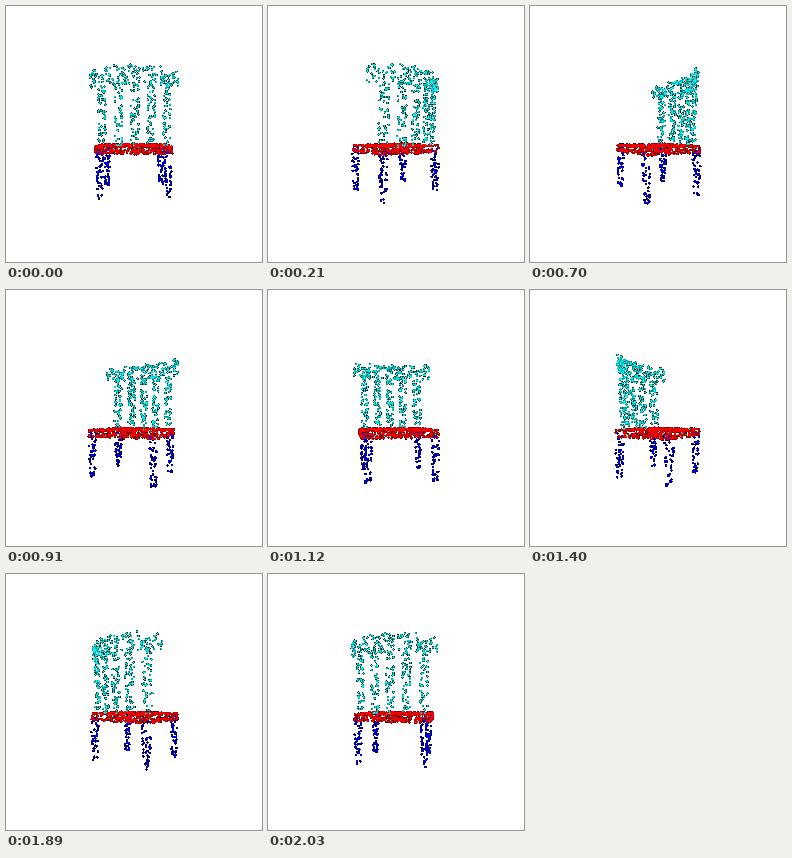
A matplotlib script that plays this animation: 256 px wide and 256 px high, repeating every 2100 ms.

```python
import numpy as np
import matplotlib.pyplot as plt
from matplotlib.animation import FuncAnimation

SIZE = 256
FRAMES = 30
DIST = 3.0                                     # camera distance
FOCAL = SIZE / 2 / np.tan(np.radians(30))      # 60 degree field of view
RADIUS = 0.01 * SIZE / 2

CYAN, BLUE, RED = (0, 1, 1), (0, 0, 1), (1, 0, 0)

rng = np.random.default_rng(5)


def box_shell(n, w, d):
    """Random points on the outline of a w x d rectangle."""
    a, b = rng.uniform(-1, 1, (2, n))
    side = rng.choice([-1, 1], n)
    wide = rng.random(n) < w / (w + d)
    return np.where(wide, a, side) * w / 2, np.where(wide, side, b) * d / 2


def back_depth(x, z):
    """Curved backrest, leaning slightly outwards."""
    return 0.385 - 0.6 * x**2 + 0.03 * z


def back_part(n, center, width, low, high):
    dx, dy = box_shell(n, width, 0.045)
    x = center + dx
    z = rng.uniform(low, high, n)
    return np.column_stack([x, back_depth(x, z) + dy, z])


def leg(n, x, y):
    z = rng.uniform(-0.775, -0.19, n)
    taper = 0.6 + 0.4 * (z + 0.775) / 0.585
    dx, dy = box_shell(n, 0.085, 0.085)
    return np.column_stack([x + dx * taper, y + dy * taper, z])


def seat(n, top=-0.155, bottom=-0.237):
    """Rounded slab: top, bottom and rim."""
    a, b = rng.uniform(-1, 1, (2, 2 * n))
    r = (a**6 + b**6) ** (1 / 6)
    keep = np.flatnonzero(r <= 1)[:n]
    a, b, r = a[keep], b[keep], r[keep]
    kind = rng.random(n)
    rim = kind < 0.2
    a, b = np.where(rim, a / r, a), np.where(rim, b / r, b)
    z = np.where(kind < 0.6, top, bottom)
    z = np.where(rim, rng.uniform(bottom, top, n), z)
    return np.column_stack([0.485 * a, 0.445 * b - 0.025, z])


back = [back_part(160, 0, 1.1, 0.58, 0.805)]
back += [back_part(50, x, 0.085, -0.14, 0.58)
         for x in (-0.39, -0.185, 0.01, 0.205, 0.4)]
legs = [leg(43, x, y) for x in (-0.41, 0.41) for y in (-0.38, 0.325)]
parts = [(np.vstack(back), CYAN), (np.vstack(legs), BLUE), (seat(440), RED)]

points = np.vstack([p for p, _ in parts])
colors = np.vstack([np.tile(c, (len(p), 1)) for p, c in parts]).astype(float)


def render(i):
    """Blend soft dots from far to near; uncovered pixels stay white."""
    t = 2 * np.pi * i / FRAMES
    x, y, z = points.T
    near = y * np.cos(t) - x * np.sin(t)
    scale = FOCAL / (DIST - near)
    sx = SIZE / 2 + (x * np.cos(t) + y * np.sin(t)) * scale
    sy = SIZE / 2 - z * scale

    img = np.zeros((SIZE, SIZE, 3))
    hit = np.zeros((SIZE, SIZE), bool)
    step = np.arange(-1, 2)
    for k in np.argsort(near):
        c, r = int(sx[k]), int(sy[k])
        dx = c + step + 0.5 - sx[k]
        dy = r + step + 0.5 - sy[k]
        alpha = np.clip(1 - (dx**2 + dy[:, None]**2) / RADIUS**2, 0, 1)
        win = np.s_[r - 1:r + 2, c - 1:c + 2]
        img[win] += alpha[..., None] * (colors[k] - img[win])
        hit[win] |= alpha > 0
    img[~hit] = 1
    return img


fig = plt.figure(figsize=(SIZE / 100, SIZE / 100), dpi=100, facecolor="white")
ax = fig.add_axes([0, 0, 1, 1])
ax.axis("off")
view = ax.imshow(render(0), interpolation="nearest", aspect="auto")


def update(i):
    view.set_data(render(i))
    return (view,)


anim = FuncAnimation(fig, update, frames=FRAMES, interval=70, repeat=True,
                     repeat_delay=0)
plt.show()
```
